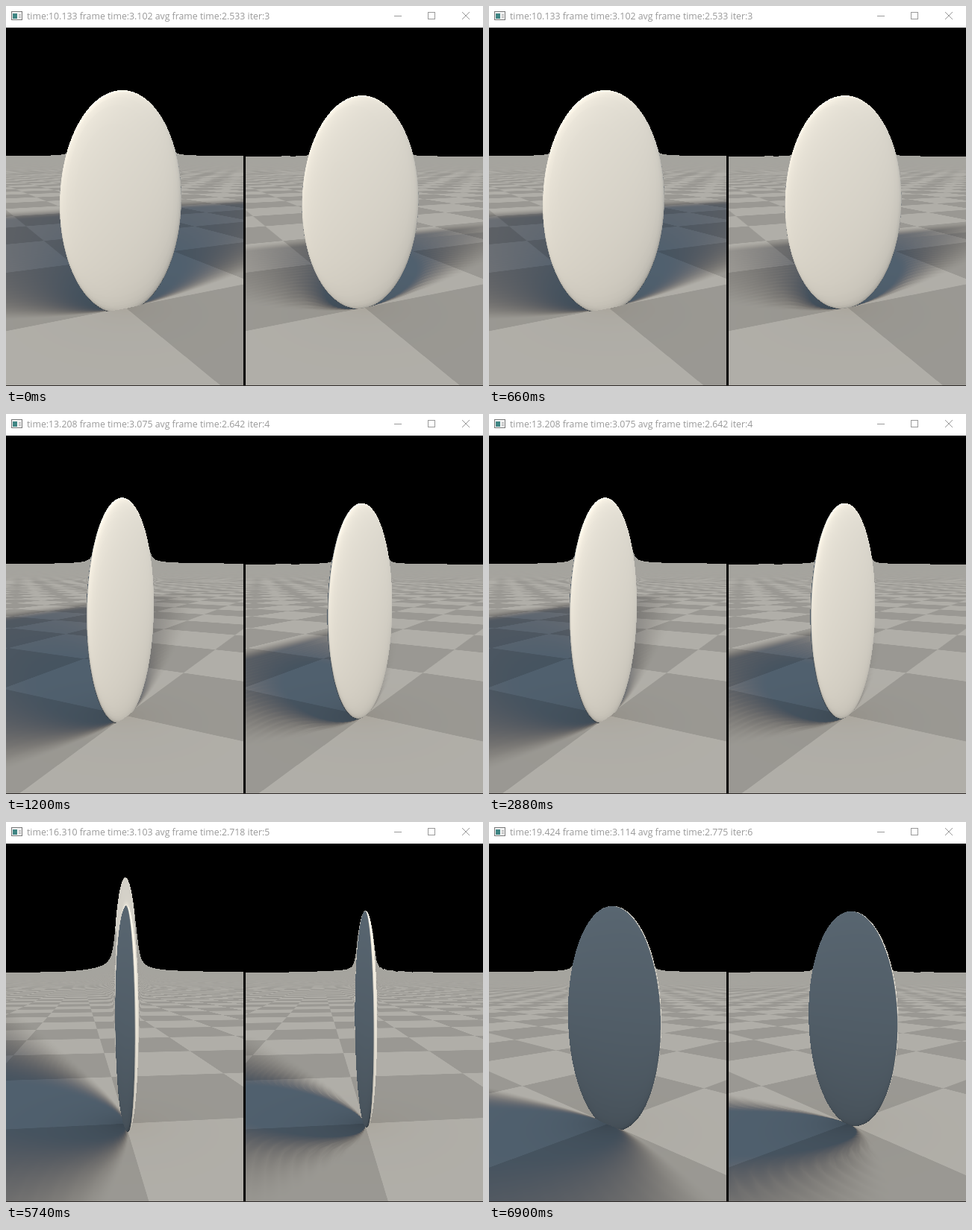
An HTML page with a canvas that plays this animation: 639 by 510 pixels, repeating every 8 s.

```html
<!DOCTYPE html>
<html lang="en">
<head>
<meta charset="utf-8">
<title>Ellipsoid distance fields</title>
<style>
  html, body { margin: 0; width: 100%; height: 100%; overflow: hidden; background: #fff; }
  canvas { position: absolute; left: 0; top: 29px; }
  svg { position: absolute; left: 0; top: 0; }
  text { font: 12.3px "Open Sans", "Noto Sans", sans-serif; fill: #999; }
</style>
</head>
<body>
<canvas id="view" width="639" height="481"></canvas>
<svg width="639" height="29" viewBox="0 0 639 29">
  <rect width="639" height="29" fill="#fff"/>
  <rect x="7.5" y="7.5" width="14" height="11" fill="#f4f4f4" stroke="#777"/>
  <rect x="9" y="10" width="6" height="7" fill="#3f8583"/>
  <path d="M17 11.5h3M17 13.5h3M17 15.5h3" stroke="#aaa"/>
  <text id="title" x="28" y="18"></text>
  <g fill="none" stroke="#999">
    <path d="M520 13.5h10"/>
    <rect x="565.5" y="8.5" width="9" height="9"/>
    <path d="M611 8l10 10M621 8l-10 10"/>
  </g>
</svg>
<script>
const W = 639, H = 480, FOCAL = 480, MID_Y = 239, LOOP = 8000;
const EYE_Y = 0.12, GROUND = -0.3, EYE_H = EYE_Y - GROUND;
const MAX_STEPS = 100, MAX_T = 100, HIT = 0.001;
const RX = 0.18, RY = 0.3, RZ = 0.02;

const LIGHT = normalize(-0.4, 0.7, 0.6);
const SHADOW_SHARPNESS = 5;
const FLOOR_AMB = [0.078, 0.1165, 0.157], FLOOR_SUN = [0.364, 0.315, 0.242];
const BODY_AMB = [0.094, 0.128, 0.16], BODY_SUN = [1.02, 0.92, 0.755];
const PENUMBRA = [1, 1.2, 1.5];

// The two halves compare distance functions; reach limits the shadow rays.
const LEFT = { sd: sdCrude, midX: 160, reach: 3 };
const RIGHT = { sd: sdBetter, midX: 480.5, reach: 1.3 };

// Each view's clock drives the orbit; titles lag one view behind the first change.
const clocks = [10.133, 13.208, 16.31, 19.424];
const viewStarts = [0, 1100, 4000, 6900];
const titleStarts = [0, 1200, 4000, 6900];
const titles = [
  "time:10.133 frame time:3.102 avg frame time:2.533 iter:3",
  "time:13.208 frame time:3.075 avg frame time:2.642 iter:4",
  "time:16.310 frame time:3.103 avg frame time:2.718 iter:5",
  "time:19.424 frame time:3.114 avg frame time:2.775 iter:6"
];

function normalize(x, y, z) {
  const l = Math.sqrt(x * x + y * y + z * z);
  return [x / l, y / l, z / l];
}
const clamp = (v, lo, hi) => v < lo ? lo : v > hi ? hi : v;

// Crude bound: scaled sphere distance.
function sdCrude(x, y, z) {
  const a = x / RX, b = y / RY, c = z / RZ;
  return (Math.sqrt(a * a + b * b + c * c) - 1) * RZ;
}

// Gradient-corrected bound.
function sdBetter(x, y, z) {
  const a = x / RX, b = y / RY, c = z / RZ;
  const k0 = Math.sqrt(a * a + b * b + c * c);
  const u = a / RX, v = b / RY, w = c / RZ;
  return k0 * (k0 - 1) / Math.sqrt(u * u + v * v + w * w);
}

// Returns the ray length, negative when the body is the nearer surface, 0 for sky.
function march(sd, ox, oz, dx, dy, dz) {
  let t = 0, body = false;
  for (let i = 0; i < MAX_STEPS; i++) {
    const y = EYE_Y + t * dy;
    const plane = y - GROUND, e = sd(ox + t * dx, y, oz + t * dz);
    body = e < plane;
    const d = body ? e : plane;
    if (d < HIT) break;
    t += d;
    if (t > MAX_T) return 0;
  }
  return body ? -t : t;
}

function softShadow({ sd, reach }, x, z) {
  if (z > 0.1 || z < -reach) return 1;
  const [lx, ly, lz] = LIGHT;
  let res = 1;
  for (let t = 0.01; t < reach;) {
    const d = sd(x + t * lx, GROUND + t * ly, z + t * lz);
    res = Math.min(res, SHADOW_SHARPNESS * d / t);
    if (res < 0.005) return 0;
    t += clamp(d, 0.01, 0.05);
  }
  return res * res * (3 - 2 * res);
}

const wave = v => Math.abs(v / 2 - Math.floor(v / 2) - 0.5);
const boxStripe = (p, w) => 2 * (wave(p - w / 2) - wave(p + w / 2)) / w;

function renderView(clock) {
  const image = new ImageData(W, H + 1), px = image.data;
  const angle = 0.2 * clock;
  const ox = Math.cos(angle), oz = Math.sin(angle);
  const fx = -ox, fz = -oz, rx = -fz, rz = fx;
  const len = Math.hypot(1, EYE_Y), sinP = EYE_Y / len, cosP = 1 / len;

  const put = (i, c, linear) => { px[i + c] = 255 * Math.pow(clamp(linear, 0, 1), 1 / 2.2); };

  const shadeBody = (i, x, y, z) => {
    const n = normalize(x / (RX * RX), y / (RY * RY), z / (RZ * RZ));
    const sun = Math.max(0, n[0] * LIGHT[0] + n[1] * LIGHT[1] + n[2] * LIGHT[2]);
    const height = clamp((y - GROUND) / 0.6, 0, 1);
    const sky = (0.78 + 0.34 * height) * (0.9 + 0.6 * Math.min(0, n[1]) + 0.1 * n[1]);
    for (let c = 0; c < 3; c++) put(i, c, BODY_AMB[c] * sky + BODY_SUN[c] * sun);
  };

  const shadeFloor = (i, panel, x, z, t) => {
    const size = t / FOCAL, depth = size * t / EYE_H;
    const wx = Math.abs(rx) * size + Math.abs(fx) * depth;
    const wz = Math.abs(rz) * size + Math.abs(fz) * depth;
    const checker = 0.5 - 0.5 * boxStripe(2 * x, wx) * boxStripe(2 * z, wz);
    const tile = 0.745 + 0.255 * checker;
    const sun = t < 12 ? softShadow(panel, x, z) : 1;
    const sky = 1 - 0.35 * Math.exp(-10 * Math.hypot(x, z));
    for (let c = 0; c < 3; c++) {
      put(i, c, tile * (FLOOR_AMB[c] * sky + FLOOR_SUN[c] * Math.pow(sun, PENUMBRA[c])));
    }
  };

  for (let row = 0; row <= H; row++) {
    const v = (MID_Y - row - 0.5) / FOCAL;
    const up = v * cosP - sinP, ahead = cosP + v * sinP;
    for (let col = 0; col < W; col++) {
      const i = 4 * (row * W + col);
      px[i + 3] = 255;
      if (row === H) { px[i] = 48; px[i + 1] = 44; px[i + 2] = 42; continue; }
      if (col >= 318 && col < 321) continue;
      const panel = col < 320 ? LEFT : RIGHT;
      const u = (col + 0.5 - panel.midX) / FOCAL;
      const n = 1 / Math.sqrt(1 + u * u + v * v);
      const dx = (fx * ahead + rx * u) * n, dy = up * n, dz = (fz * ahead + rz * u) * n;
      const hit = march(panel.sd, ox, oz, dx, dy, dz);
      if (hit === 0) continue;
      const t = Math.abs(hit), x = ox + t * dx, z = oz + t * dz;
      if (hit < 0) shadeBody(i, x, EYE_Y + t * dy, z);
      else shadeFloor(i, panel, x, z, t);
    }
  }
  return image;
}

const ctx = document.getElementById("view").getContext("2d");
const title = document.getElementById("title");
const cache = [];
const viewAt = i => cache[i] || (cache[i] = renderView(clocks[i]));
const indexAt = (starts, t) => starts.filter(s => s <= t).length - 1;
let shown = -1;

function draw(t) {
  const view = indexAt(viewStarts, t);
  if (view !== shown) {
    ctx.putImageData(viewAt(view), 0, 0);
    shown = view;
  }
  const label = titles[indexAt(titleStarts, t)];
  if (title.textContent !== label) title.textContent = label;
}

draw(0);
const start = performance.now();
function tick() {
  draw((performance.now() - start) % LOOP);
  // Prepare one upcoming view per tick so that later changes are instant.
  const next = clocks.findIndex((_, i) => !cache[i]);
  if (next >= 0) viewAt(next);
  requestAnimationFrame(tick);
}
requestAnimationFrame(tick);
</script>
</body>
</html>
```
